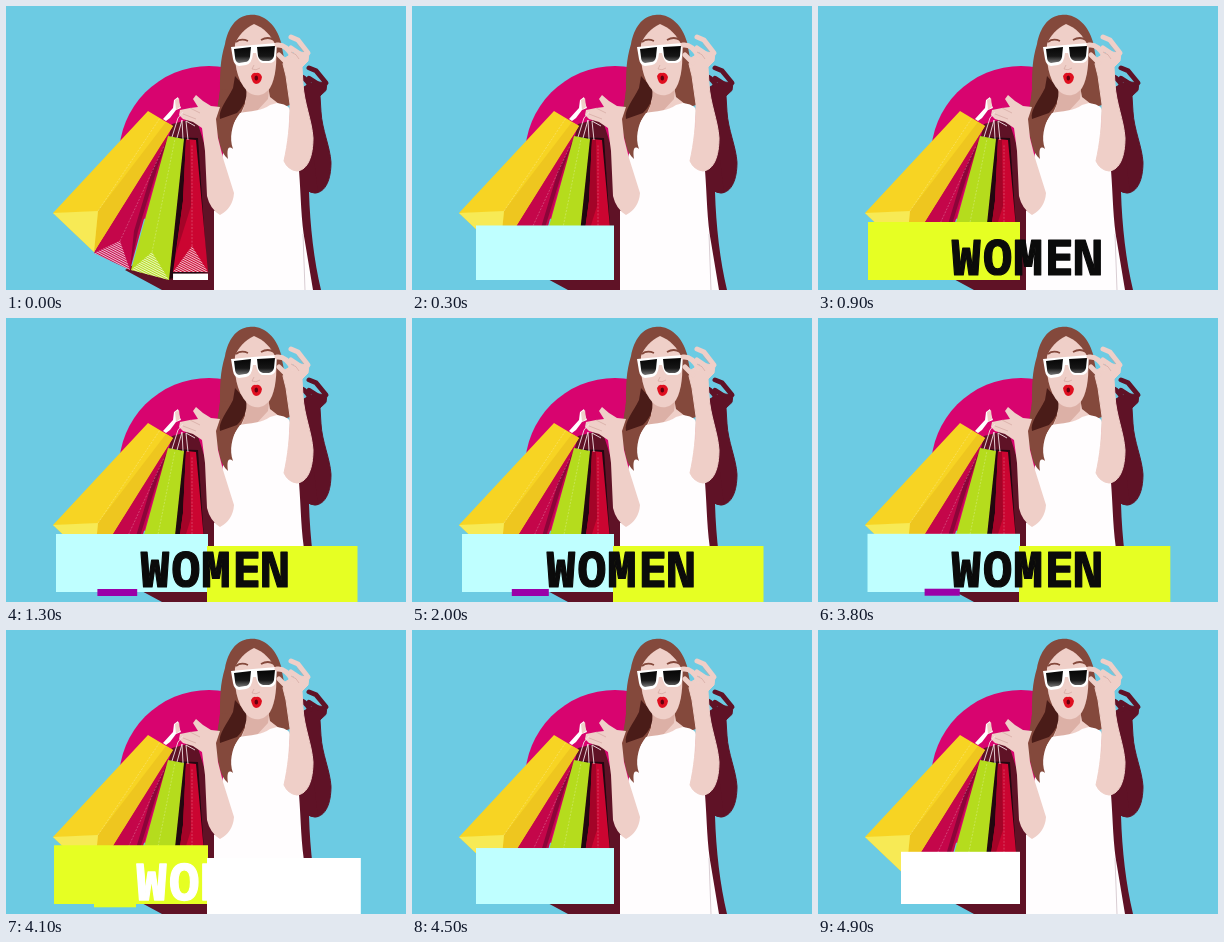
Animation, 400 px wide and 284 px high, one loop 5000 ms. Source, as an HTML page:

```html
<!DOCTYPE html>
<html lang="en">
<head>
<meta charset="utf-8">
<title>Women</title>
<style>
html, body { margin: 0; height: 100%; overflow: hidden; background: #6ccbe3; }
svg { display: block; width: 100vw; height: 100vh; }
.skin { fill: #efcfc8; }
.hair { fill: #84493c; }
.deep { fill: #4a1c18; }
.dark { fill: #5f1226; }
.fold { fill: none; stroke: #fff; stroke-width: .6; stroke-dasharray: 2 1.4; opacity: .4; }
.cord { fill: none; stroke: #f3e3e6; stroke-width: .9; }
.line { fill: none; stroke: #cfa29b; stroke-width: .6; }
.finger { fill: none; stroke: #efcfc8; stroke-width: 5; stroke-linecap: round; stroke-linejoin: round; }

/* 2% of the loop is one 100 ms tick; steps(n) spans n ticks */
.left, .right, .bar, .word { animation: 5s infinite; }
.left { transform-origin: 202px 274px; animation-name: left, left-ink; }
.right { transform-origin: 201px 228px; animation-name: right, right-ink; }
.bar { animation-name: bar, bar-ink; }
.word {
  transform-origin: 208px 252px; animation-name: word, word-ink;
  font: 700 48px "Noto Sans Mono", "DejaVu Sans Mono", monospace;
  text-anchor: middle; stroke-width: 1.2; stroke-linejoin: round;
}

@keyframes left {
  0% { transform: scale(.23, .11); animation-timing-function: steps(1); }
  2% { transform: scale(.66, .62); animation-timing-function: steps(1); }
  4% { transform: scale(.84, .87); animation-timing-function: steps(1); }
  6% { transform: scale(.908, .94); animation-timing-function: steps(3); }
  12% { transform: scale(.94, .97); animation-timing-function: steps(3); }
  18% { transform: none; animation-timing-function: steps(1); }
  20% { transform: scale(1.013); animation-timing-function: steps(2); }
  24%, 74% { transform: none; animation-timing-function: steps(4); }
  82% { transform: scale(1.013); animation-timing-function: steps(1); }
  84% { transform: scale(.974, .99); animation-timing-function: steps(6); }
  96% { transform: scale(.842, .94); animation-timing-function: steps(1); }
  98% { transform: scale(.783, .9); animation-timing-function: steps(1); }
  100% { transform: scale(.23, .11); }
}
@keyframes left-ink {
  0%, 96%, 100% { fill: #fff; animation-timing-function: step-end; }
  4%, 88% { fill: #bfffff; animation-timing-function: step-end; }
  14%, 80% { fill: #e6ff23; animation-timing-function: step-end; }
  22% { fill: #bfffff; animation-timing-function: step-end; }
}
@keyframes right {
  0%, 18% { transform: scale(0); animation-timing-function: steps(1); }
  20% { transform: scale(.6, .7); animation-timing-function: steps(1); }
  22% { transform: scale(.94); animation-timing-function: steps(1); }
  24%, 74% { transform: none; animation-timing-function: steps(4); }
  82% { transform: scale(1.022); animation-timing-function: steps(1); }
  84% { transform: scale(.955); animation-timing-function: steps(3); }
  90%, 100% { transform: scale(0); }
}
@keyframes right-ink {
  0%, 80%, 100% { fill: #fff; animation-timing-function: step-end; }
  24% { fill: #e6ff23; animation-timing-function: step-end; }
}
@keyframes bar {
  0%, 20% { x: 89px; y: 271px; width: 0; animation-timing-function: steps(1); }
  22% { x: 89px; y: 271px; width: 40.6px; animation-timing-function: steps(25); }
  72% { x: 119px; y: 271px; width: 30.6px; animation-timing-function: steps(5); }
  82% { x: 88px; y: 270.3px; width: 42px; animation-timing-function: steps(4); }
  90%, 100% { x: 130px; y: 271px; width: 0; }
}
@keyframes bar-ink {
  0%, 78%, 100% { fill: #e6ff23; animation-timing-function: step-end; }
  24% { fill: #9a00a8; animation-timing-function: step-end; }
}
@keyframes word {
  0%, 10% { transform: scale(0); animation-timing-function: steps(3); }
  16% { transform: scale(1.05); animation-timing-function: steps(1); }
  18% { transform: scale(1.015); animation-timing-function: steps(2); }
  22%, 74% { transform: none; animation-timing-function: steps(4); }
  82% { transform: scale(1.06); animation-timing-function: steps(4); }
  90%, 100% { transform: scale(0); }
}
@keyframes word-ink {
  0%, 80%, 100% { fill: #fff; stroke: #fff; animation-timing-function: step-end; }
  16% { fill: #0b0b0b; stroke: #0b0b0b; animation-timing-function: step-end; }
}
</style>
</head>
<body>
<svg viewBox="0 0 400 284">
  <defs>
    <pattern id="hatch" width="2" height="2" patternUnits="userSpaceOnUse" patternTransform="rotate(28)">
      <rect width="2" height="1" fill="#fff" opacity=".75"/>
    </pattern>
    <linearGradient id="lens" x2="0" y2="1">
      <stop stop-color="#050505"/><stop offset=".6" stop-color="#161616"/><stop offset="1" stop-color="#777"/>
    </linearGradient>
    <g id="arm">
      <path d="M279 52Q286 46 294 46L303 47 302 55 296 61 297 78C298 97 306 115 307 132C307 150 302 164 291 165Q282 164 278 155C282 137 284 119 284 98L280 70 277 58Z"/>
      <path class="finger" style="stroke: inherit" d="M271 39Q280 38 286 50M285 31L292 34 302 47M285 42L294 48M273 49L281 57"/>
    </g>
  </defs>
  <rect width="400" height="284" fill="#6ccbe3"/>
  <circle cx="203" cy="150" r="90" fill="#d8046f"/>

  <!-- shadows -->
  <use href="#arm" class="dark" stroke="#5f1226" transform="translate(18 33) scale(1 .934)"/>
  <path class="dark" d="M297 95L304 120 312 187 303 186C304 220 308 255 315 284H296L288 160Z"/>
  <path class="dark" d="M166 118L190 112 199 140 204 190 213 205 212 284H156L119 264 158 240 163 130Z"/>

  <!-- figure -->
  <path class="hair" d="M243 9C257 7 270 18 275 36C279 58 284 78 284 99L262 106 236 110C229 117 224 130 228 142C222 138 221 145 222 153C214 145 214 136 211 126C208 112 213 98 214 84C214 68 214 54 219 38C222 22 230 10 243 9Z"/>
  <path class="skin" d="M240 78L262 80 264 91 273 98 262 108 234 109 239 98Z"/>
  <path fill="#dcb0a6" d="M240 82L263 84 262 93 250 106 236 107 239 98Z"/>
  <path fill="#fffdfe" d="M234 107C244 105 256 105 264 99L271 97C278 98 283 100 284 104L283 130 279 155 293 164C295 190 295 215 299 236L307 284H208V205L226 190 216 152C220 132 227 116 234 107Z"/>
  <path d="M297 228L299 284" fill="none" stroke="#d9cdd3" stroke-width="1"/>
  <path class="hair" d="M214 84L236 82C241 93 237 101 231 110C226 120 223 132 227 143C221 138 221 146 222 153C214 146 214 136 211 126C208 112 213 98 214 84Z"/>
  <path class="deep" d="M229 70L240 82C242 94 237 101 231 107L214 113C212 104 221 94 227 82Z"/>
  <path class="skin" d="M229 38C228 56 230 73 241 85C249 92 258 90 264 82C270 72 271 55 270 40C265 29 258 22 248 18C239 22 232 30 229 38Z"/>
  <path d="M230 36Q235 32 242 35M255 34Q262 30 268 34" fill="none" stroke="#84493c" stroke-width="1.8"/>
  <path fill="#fff" d="M225 41L247 39 271 37 270 51Q269 57 263 57L256 57Q252 56 250 47H247Q246 58 240 59L233 60Q228 59 227 53Z"/>
  <path fill="url(#lens)" d="M228 43L245 41 244 51Q243 56 239 56L233 57Q229 56 229 51ZM251 41L269 40 268 50Q267 54 263 55L257 55Q253 54 252 50Z"/>
  <path class="line" d="M248 59L246 63Q250 65 254 62"/>
  <path fill="#df0f20" d="M245 70Q247 66 250 67 254 66 256 71 255 78 250 78 246 77 245 70Z"/>
  <ellipse cx="250.300" cy="72" rx="1.800" ry="2.600" fill="#64000e"/>

  <!-- raised arm -->
  <use href="#arm" class="skin" stroke="#efcfc8"/>
  <path class="line" d="M285 46Q291 48 293 53M291 38L298 46"/>

  <!-- bags -->
  <path fill="#220710" d="M163 131L192 132 201 266 163 273Z"/>
  <path fill="#c4064a" d="M158 126L164 132 147 180 124 264 88 247 107 205Z"/>
  <path fill="#8c0539" d="M163 130L152 160 132 225 124 264 128 225 146 165Z"/>
  <path fill="url(#hatch)" d="M88 247L114 235 124 264Z"/>
  <path class="fold" d="M114 235L158 140"/>

  <path fill="#f7d423" d="M142 105L167 120 152 143 88 246 47 207Z"/>
  <path fill="#eec61f" d="M160 116L167 120 88 246 92 205Z"/>
  <path fill="#f7ea55" d="M47 207L92 205 88 246Z"/>
  <path class="fold" d="M92 205L154 112"/>

  <path fill="#cb0531" d="M180 133L190 134 202 266H167L177 195Z"/>
  <path fill="#a40428" d="M180 133L184 134 185 200 170 248 177 195Z"/>
  <path fill="url(#hatch)" d="M167 266L186 240 202 266Z"/>
  <path class="fold" d="M186 240V138"/>

  <path fill="#b5dc1d" d="M162 130L178 133 163 274 125 264Z"/>
  <path fill="url(#hatch)" d="M125 264L146 246 163 274Z"/>
  <path class="fold" d="M146 246L169 133"/>

  <!-- lower arm and cords -->
  <path class="skin" d="M174 104L184 102 192 101 187 93 190 89 197 95 205 100 214 101 210 113 212 132 217 152 228 187Q227 202 214 209 204 203 201 190L199 145 196 122 187 116 177 113 173 109Z"/>
  <path class="line" d="M184 102L194 107M177 108L190 113"/>
  <path fill="#fff" d="M157 113L167 102 168 94 172 91 173 97 175 102 170 104 164 112 160 115Z"/>
  <path class="skin" d="M169 94L173 92 174 101 170 104Z"/>
  <path class="cord" d="M166 131L172 112 177 106M171 132L176 114 177 133M182 134L180 115 189 120"/>

  <!-- caption -->
  <rect class="left" x="50" y="216" width="152" height="58"/>
  <rect class="right" x="201" y="228" width="150.500" height="60"/>
  <rect class="bar" height="7"/>
  <text class="word" x="149 180 210 241 269" y="269">WOMEN</text>
</svg>
</body>
</html>
```
